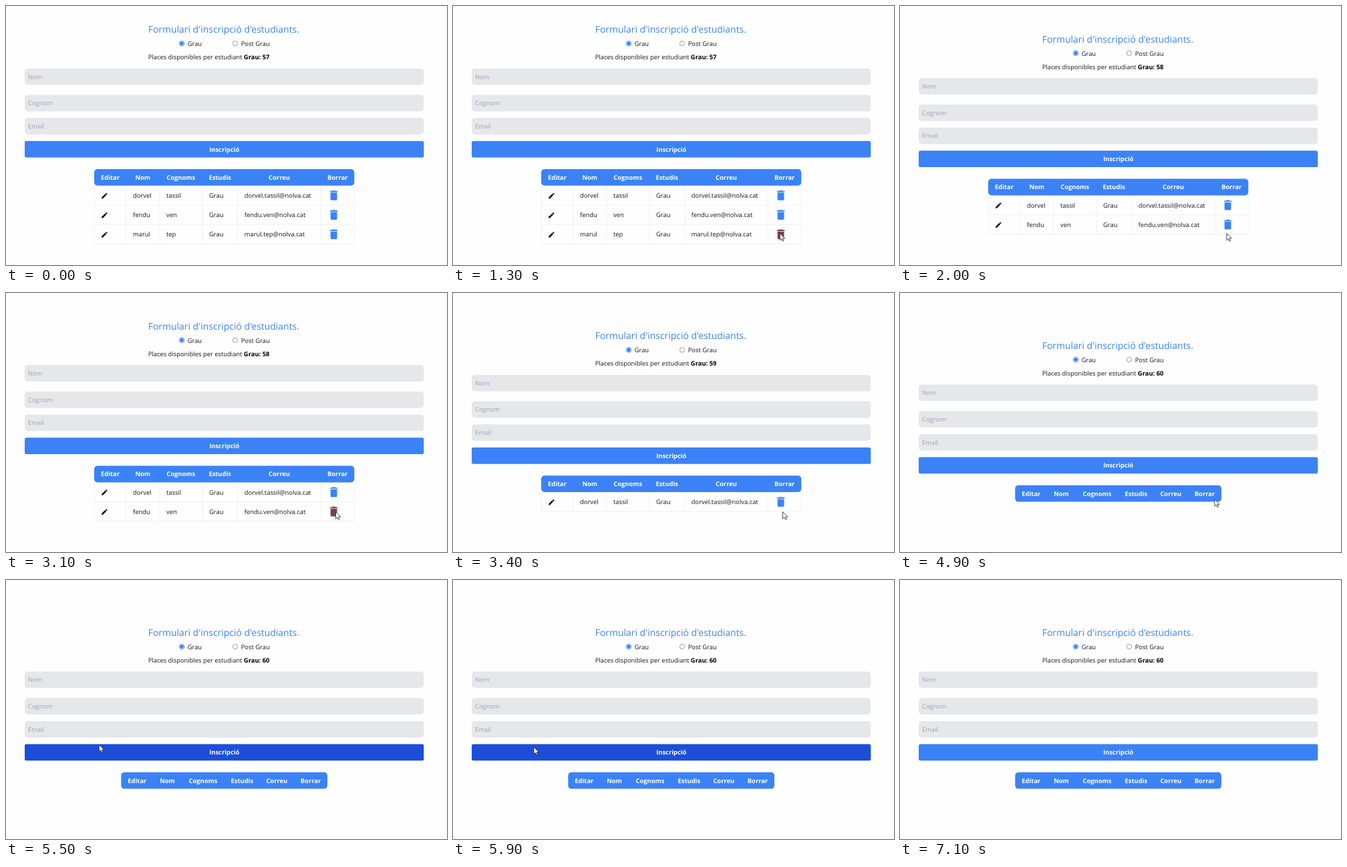
Write an HTML page that moves like this. It is 660 by 389 pixels and loops after 8.4 s.

```html
<!DOCTYPE html>
<html lang="ca">
<head>
<meta charset="utf-8">
<style>
  html, body { margin: 0; width: 100%; height: 100%; overflow: hidden; background: #fefefe; }
  svg { display: block; font: 9.4px "Open Sans", "Noto Sans", sans-serif; text-rendering: geometricPrecision; }
  .bold { font-weight: 700; }
  .head { font-weight: 700; fill: #fff; text-anchor: middle; }
</style>
</head>
<body>
<svg id="stage" width="660" height="389" viewBox="0 0 660 389"></svg>
<script>
const LOOP = 8400, TICK = 100, ROW = 29.2;
const BLUE = '#3b82f6', DARK_BLUE = '#1d4ed8', MAROON = '#744248', INK = '#18181b';
const stage = document.getElementById('stage');

const students = [['dorvel', 'tassil'], ['fendu', 'ven'], ['marul', 'tep']];
const deletions = [2000, 3400, 4600];
const headings = ['Editar', 'Nom', 'Cognoms', 'Estudis', 'Correu', 'Borrar'];
const fullTable = { x: 132, w: 389.3, centers: [156, 204.7, 261.7, 320.2, 409, 496.2] };
const emptyTable = { x: 172.3, w: 308.7, centers: [196.3, 241.5, 295, 353.3, 405.3, 456] };

// Pointer path: time, x, y
const path = [
  [300, 522, 368], [1100, 489.3, 341.5], [2400, 488.8, 341.5], [2900, 493.5, 328.7],
  [3500, 493.5, 328.7], [3900, 490.3, 313.5], [4800, 490.3, 313.5], [5500, 139.3, 247.5],
  [5900, 121, 251], [6800, 121, 251], [7100, 112, 368]
];

const PENCIL = 'M3 17.25V21h3.75L17.81 9.94l-3.75-3.75zM20.71 7.04c.39-.39.39-1.02 0-1.41l-2.34-2.34c-.39-.39-1.02-.39-1.41 0l-1.83 1.83 3.75 3.75z';
const TRASH = 'M6 19c0 1.1.9 2 2 2h8c1.1 0 2-.9 2-2V7H6zM19 4h-3.5l-1-1h-5l-1 1H5v2h14z';
const ARROW = 'M0 0V10.4L2.4 8.2 4 11.8 5.6 11.1 4.1 7.6H7.4Z';

const rect = (x, y, w, h, r, fill) =>
  `<rect x="${x}" y="${y}" width="${w}" height="${h}" rx="${r}" fill="${fill}"/>`;
const text = (x, y, s, attrs = '') => `<text x="${x}" y="${y}" fill="${INK}" ${attrs}>${s}</text>`;
const heading = (x, y, s) => `<text x="${x}" y="${y}" class="head">${s}</text>`;
const icon = (d, cx, cy, scale, fill) =>
  `<path d="${d}" fill="${fill}" transform="translate(${cx} ${cy}) scale(${scale}) translate(-12 -12)"/>`;

function pointerAt(t) {
  const i = path.findIndex(key => key[0] > t);
  if (i < 1) return null;
  const [t0, x0, y0] = path[i - 1], [t1, x1, y1] = path[i];
  const p = (t - t0) / (t1 - t0), e = p * p * (3 - 2 * p);
  return { x: x0 + (x1 - x0) * e, y: y0 + (y1 - y0) * e };
}

function inside(pointer, x, y, w, h) {
  return pointer && pointer.x >= x && pointer.x <= x + w && pointer.y >= y && pointer.y <= y + h;
}

function form(dy, places, pointer) {
  const field = (y, label) => rect(28, y, 597.3, 24.8, 5, '#e5e7eb') +
    `<text x="33" y="${y + 15.8}" fill="#9ca3af">${label}</text>`;
  const hover = inside(pointer, 28, 202.7 + dy, 597, 24.8);
  return `<text x="212.7" y="40" font-size="13.95" fill="${BLUE}">Formulari d'inscripció d'estudiants.</text>
    <circle cx="263" cy="56.3" r="3.6" fill="#fff" stroke="#2878ee"/>
    <circle cx="263" cy="56.3" r="2.4" fill="#2878ee"/>
    <circle cx="343" cy="56.3" r="3.6" fill="#fff" stroke="#858585" stroke-width=".8"/>` +
    text(271.7, 60, 'Grau') + text(351.7, 60, 'Post Grau') +
    text(212.7, 80, `Places disponibles per estudiant <tspan class="bold" fill="#000">Grau: ${places}</tspan>`) +
    field(93.7, 'Nom') + field(133.4, 'Cognom') + field(168.1, 'Email') +
    rect(28, 202.7, 597.3, 24.8, 2.5, hover ? DARK_BLUE : BLUE) + heading(326.8, 218.6, 'Inscripció');
}

function row(i, dy, pointer) {
  const [name, surname] = students[i];
  const top = 269.8 + i * ROW, mid = top + ROW / 2, base = mid + 3.6;
  const hover = inside(pointer, 485, mid + dy - 7.6, 11.5, 15.2);
  const lines = [132.4, 179.5, 230, 294, 346.8, 471, 521]
    .map(x => `M${x} ${top}v${ROW}`).join('');
  return `<path d="${lines}M132 ${top + ROW}h389.3" fill="none" stroke="#eceef1" stroke-width=".8"/>` +
    icon(PENCIL, 147.4, mid + .6, .47, '#000') +
    text(190, base, name) + text(240, base, surname) + text(304, base, 'Grau') +
    text(356.8, base, `${name}.${surname}@nolva.cat`) +
    icon(TRASH, 490.6, mid, .82, hover ? MAROON : BLUE);
}

function draw(t) {
  const removed = deletions.filter(time => t >= time).length;
  const count = students.length - removed;
  const dy = removed * ROW / 2;
  const pointer = pointerAt(t);
  const table = count ? fullTable : emptyTable;
  let svg = `<g transform="translate(0 ${dy})">` + form(dy, 57 + removed, pointer) +
    rect(table.x, 245, table.w, 24.8, 5, BLUE) +
    headings.map((s, i) => heading(table.centers[i], 260.8, s)).join('');
  for (let i = 0; i < count; i++) svg += row(i, dy, pointer);
  svg += '</g>';
  if (pointer) {
    svg += `<path d="${ARROW}" fill="#fff" stroke="#222" stroke-width=".8" transform="translate(${pointer.x} ${pointer.y})"/>`;
  }
  stage.innerHTML = svg;
}

let shown = -1;
function frame() {
  const t = Math.floor(performance.now() % LOOP / TICK) * TICK;
  if (t !== shown) draw(shown = t);
  requestAnimationFrame(frame);
}
frame();
</script>
</body>
</html>
```
